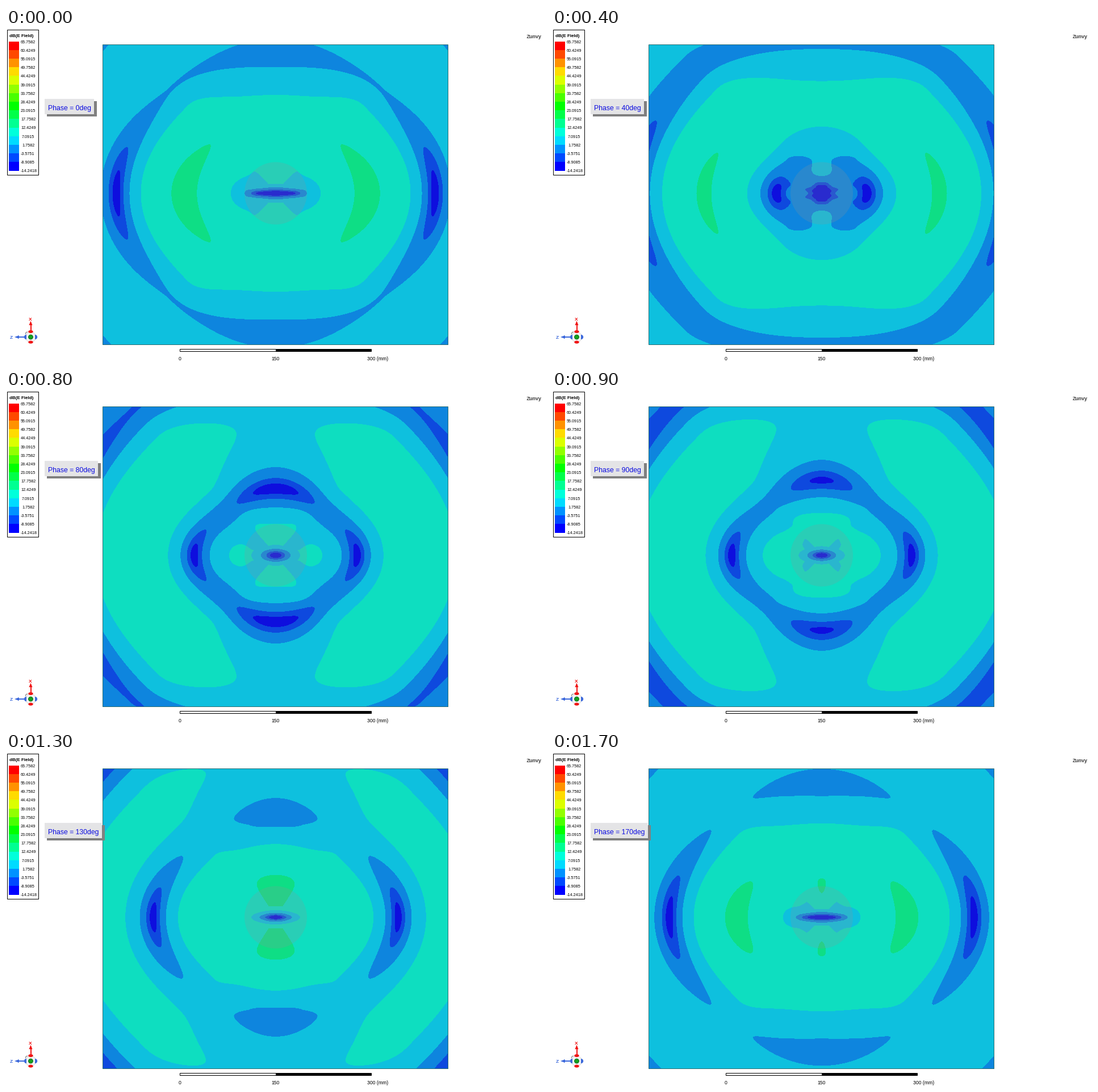
A matplotlib script that plays this animation: 951x589 px, repeating every 1800 ms.

```python
import numpy as np
import matplotlib.pyplot as plt
from matplotlib.animation import FuncAnimation
from matplotlib.patches import Circle, Ellipse, Polygon, Rectangle, Wedge

W, H, DPI = 951, 589, 100
LEFT, RIGHT, TOP, BOTTOM = 171, 779, 30, 559
CX, CY = 475, 291.5
LEVEL_MIN, LEVEL_MAX, BANDS = -14.2418, 65.7582, 15
SANS = "Liberation Sans"


def rainbow(i):
    """Legend colour of band i, counted from the top (red) to blue."""
    t = i * 4 / (BANDS - 1)
    return np.clip([2 - t, min(t, 4 - t), t - 2], 0, 1)


# ---- field model: each point has a peak, a floor and a null phase ----

def power(db):
    return 10 ** (db / 10)


def hump(top, at, inner, outer, inner_power=2):
    """Radial curve in dB that falls off on both sides of its top."""
    fall_in = (np.maximum(at - rad, 0) / inner) ** inner_power
    fall_out = (np.maximum(rad - at, 0) / outer) ** 2
    return top - fall_in - fall_out


def blend(axis_z, diagonal, axis_x, k_z, k_x):
    """Mix the curves along the two axes and the diagonal by angle."""
    near_z = theta < np.pi / 4
    s = np.sin(2 * theta) ** 2
    w = s / (s + np.where(near_z, k_z, k_x) * (1 - s) + 1e-9)
    return np.where(near_z, axis_z, axis_x) * (1 - w) + diagonal * w


dx, dy = np.meshgrid(np.abs(np.arange(LEFT, RIGHT) + 0.5 - CX),
                     np.abs(np.arange(TOP, BOTTOM) + 0.5 - CY))
rad = np.hypot(dx, dy)
theta = np.arctan2(dy, dx)

peak_z = hump(12.85, 168, 66, 82)
peak_d = hump(12.45, 155, 62, 76)
peak_x = 6.4 + 7.4 * np.exp(-(rad / 150) ** 3)
peak = blend(power(peak_z), power(peak_d), power(peak_x), 1, 8)

# flat slot of weak field across the middle
slot = np.maximum(np.hypot(dx / 3.2, dy), 1)
peak = np.minimum(peak, power(27 * np.log10(slot) - 22.5))

floor_d = np.maximum(hump(0.8, 45, 18, 18), hump(2.5, 205, 58, 60, 4))
floor_x = np.maximum(hump(1.3, 38, 10, 10), hump(0.6, 205, 21, 32))
floor = blend(power(-16), power(floor_d), power(floor_x),
              1, np.interp(rad, [110, 170], [3, 0.6]))
floor *= 1 - np.exp(-(rad / 22) ** 4)
floor = np.minimum(floor, peak)

null_z = -1.1 + 0.482 * rad + 0.00058 * rad ** 2
null_z *= 1 - 0.7 * np.exp(-(rad / 45) ** 2)
null_d = 4.8 + 0.56 * rad + 0.000464 * rad ** 2
null_d = (null_d ** 6 + 40 ** 6) ** (1 / 6)
null_x = 44 + 142 * (rad / 249) ** 1.84
null = blend(null_z, null_d, null_x, np.interp(rad, [45, 90], [0.2, 1]), 2)

palette = np.array([14 + 208 * rainbow(BANDS - 1 - i) for i in range(BANDS)])
palette = palette.round().astype(np.uint8)


def field_image(phase):
    lag = np.radians(phase - null)
    energy = peak * np.sin(lag) ** 2 + floor * np.cos(lag) ** 2
    db = 10 * np.log10(energy + 1e-9)
    step = (LEVEL_MAX - LEVEL_MIN) / BANDS
    band = np.clip((db - LEVEL_MIN) // step, 0, BANDS - 1).astype(int)
    return palette[band]


# ---- stage ----

fig = plt.figure(figsize=(W / DPI, H / DPI), dpi=DPI, facecolor="white")
ax = fig.add_axes([0, 0, 1, 1])


def px(size):
    return size * 72 / DPI


def label(x, y, text, size, color="black", **kw):
    kw.setdefault("va", "center_baseline")
    return ax.text(x, y, text, fontsize=px(size), color=color, family=SANS, **kw)


def box(x0, y0, x1, y1, face="none", edge="none", z=1, **kw):
    return ax.add_patch(Rectangle((x0, y0), x1 - x0, y1 - y0, facecolor=face,
                                  edgecolor=edge, linewidth=px(1), zorder=z,
                                  snap=False, **kw))


picture = ax.imshow(field_image(0), extent=(LEFT, RIGHT, BOTTOM, TOP),
                    interpolation="nearest", aspect="auto", zorder=1)
ax.set_xlim(0, W)
ax.set_ylim(H, 0)
ax.axis("off")
box(170.5, 29.5, 778.5, 558.5, edge="#2b6f74", z=3)
ax.add_patch(Circle((475, 291.5), 55, facecolor="#8c9696", alpha=0.22,
                    linewidth=0, zorder=2))


def draw_legend():
    box(2.5, 3.5, 57.5, 259.5, "white", "black")
    label(5.5, 14, "dB(E Field)", 8, weight="bold")
    top, height = 24.3, 15.17
    for i in range(BANDS):
        y = top + i * height
        box(5, y, 23, y + height, rainbow(i), antialiased=False)
    for i, v in enumerate(np.linspace(LEVEL_MAX, LEVEL_MIN, BANDS + 1)):
        x = 28 if 0 < v < 10 else 26
        label(x, top + i * height, f"{v:.4f}", 7.3)


def draw_scale():
    box(306.5, 566.5, 475.5, 570.5, "white", "black")
    box(475.5, 566.5, 643.5, 570.5, "black", "black")
    for x, text in ((306, "0"), (475, "150"), (654.5, "300 (mm)")):
        label(x, 582, text, 8.6, ha="center")


def draw_triad():
    red, blue = "#f01414", "#3c69dc"
    ax.plot([43.5, 43.5], [536, 522], color=red, lw=px(2), solid_capstyle="butt")
    ax.add_patch(Polygon([(43.5, 516.5), (40.5, 524), (46.5, 524)], color=red, lw=0))
    ax.plot([34, 22], [545, 545], color=blue, lw=px(2), solid_capstyle="butt")
    ax.add_patch(Polygon([(15, 545), (23, 542), (23, 548)], color=blue, lw=0))
    label(43, 513, "X", 8.5, red, ha="center", weight="bold")
    label(9.5, 546, "Z", 8.5, blue, ha="center", weight="bold")
    ax.add_patch(Circle((43.5, 545), 9, facecolor="#f4f4f4",
                        edgecolor="#d8d8d8", lw=px(0.8)))
    for y in (535.5, 554):
        ax.add_patch(Ellipse((43.5, y), 8.5, 5, color=red, lw=0, zorder=3))
    ax.add_patch(Wedge((36, 545), 4.2, 90, 270, color=blue, lw=0, zorder=3))
    ax.add_patch(Wedge((51, 545), 4.2, -90, 90, color=blue, lw=0, zorder=3))
    ax.add_patch(Circle((43.5, 545), 4, facecolor="#14a01e",
                        edgecolor="#0c6414", lw=px(0.8), zorder=4))
    ax.plot([34.5, 35, 37.5], [539.5, 537, 536], color="#707070", lw=px(1))


draw_legend()
draw_scale()
draw_triad()
label(943, 14, "Zunvy", 9, "#3c3c3c", ha="right", weight="bold")

shadow = box(72, 129, 160, 156, "#808080", z=4, antialiased=False)
plate = box(68, 125, 156, 152, "#e4e4e6", z=5, antialiased=False)
caption = label(73.5, 145, "", 12.3, "#0a0ae0", va="baseline", zorder=6)


def update(frame):
    phase = 10 * frame
    picture.set_data(field_image(phase))
    caption.set_text(f"Phase = {phase}deg")
    width = 88 + 6.6 * (len(str(phase)) - 1)
    shadow.set_width(width)
    plate.set_width(width - 1)
    return picture, caption, shadow, plate


anim = FuncAnimation(fig, update, frames=18, interval=100, repeat=True,
                     repeat_delay=0, blit=False)
plt.show()
```
